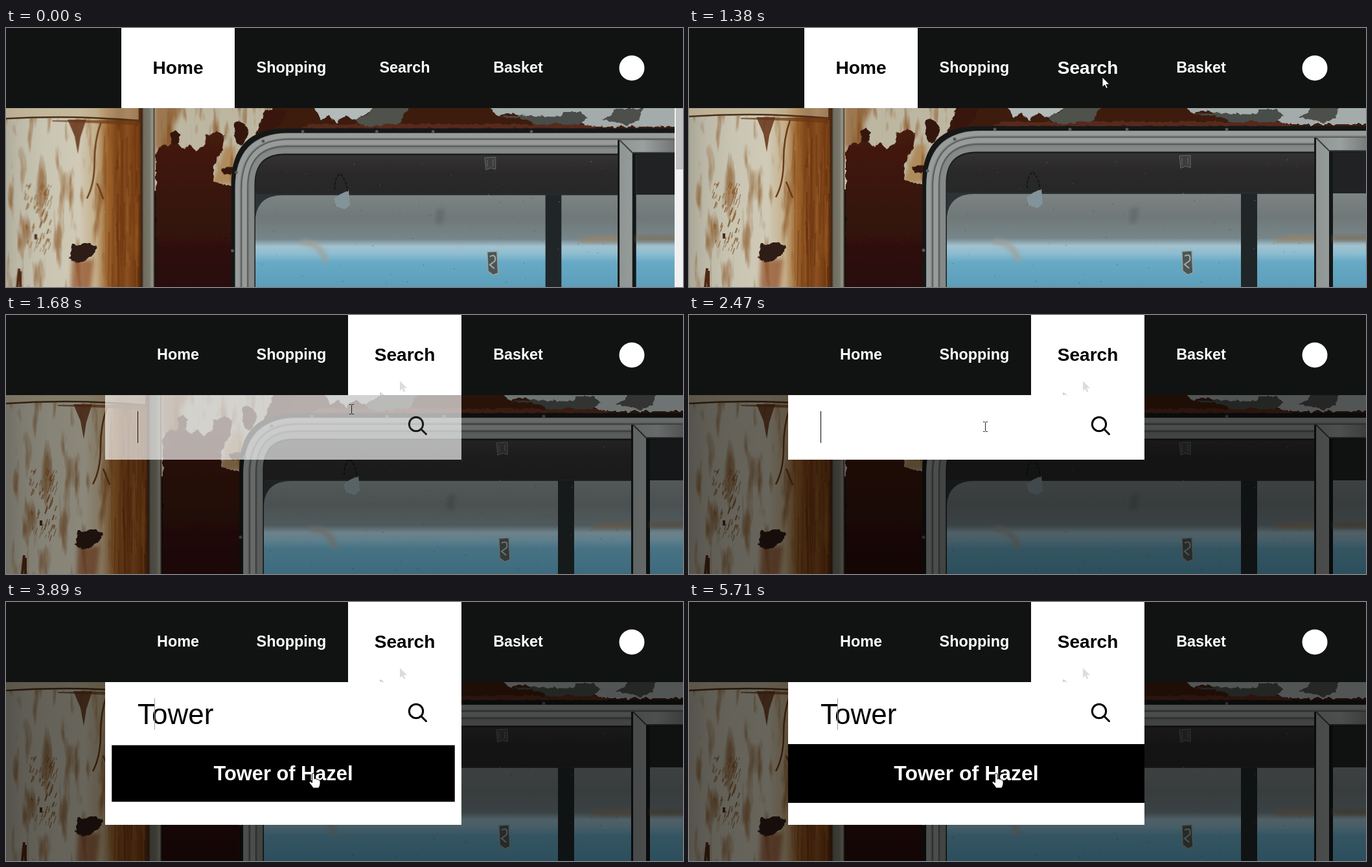
An HTML page that plays this animation: 1045 px wide and 401 px high, repeating every 5.89 s.

```html
<!DOCTYPE html>
<html lang="en">
<head>
<meta charset="utf-8">
<title>Shop navigation</title>
<style>
html, body { margin: 0; width: 100%; height: 100%; overflow: hidden; background: #101312; }
svg { display: block; width: 1045px; height: 401px; font-family: "Liberation Sans", Arial, sans-serif; }
.nav { font-weight: 700; font-size: 23.4px; text-anchor: middle; fill: #fff; }
</style>
</head>
<body>
<svg viewBox="0 0 1045 401" xmlns="http://www.w3.org/2000/svg">
<defs>
  <linearGradient id="wall">
    <stop offset="0" stop-color="#aaa798"/><stop offset=".12" stop-color="#bdb9a8"/>
    <stop offset=".3" stop-color="#c9c5b3"/><stop offset=".55" stop-color="#d0cab6"/>
    <stop offset=".67" stop-color="#c3ad88"/><stop offset=".75" stop-color="#a0672f"/>
    <stop offset=".83" stop-color="#713811"/><stop offset=".89" stop-color="#8a4f20"/>
    <stop offset=".95" stop-color="#71390f"/><stop offset="1" stop-color="#43200e"/>
  </linearGradient>
  <linearGradient id="post">
    <stop offset="0" stop-color="#2b2018"/><stop offset=".15" stop-color="#6f6c5d"/>
    <stop offset=".6" stop-color="#77766a"/><stop offset=".85" stop-color="#98978a"/><stop offset="1" stop-color="#3a2a1e"/>
  </linearGradient>
  <linearGradient id="rust" x2="0" y2="1">
    <stop offset="0" stop-color="#451b0e"/><stop offset=".45" stop-color="#37140a"/><stop offset="1" stop-color="#280e08"/>
  </linearGradient>
  <linearGradient id="view" gradientUnits="userSpaceOnUse" x1="0" y1="256" x2="0" y2="401">
    <stop offset="0" stop-color="#7b8383"/><stop offset=".25" stop-color="#707878"/>
    <stop offset=".48" stop-color="#76868a"/><stop offset=".56" stop-color="#a2c2cf"/>
    <stop offset=".64" stop-color="#8dbdd0"/><stop offset=".73" stop-color="#68aac5"/><stop offset="1" stop-color="#5b9eb9"/>
  </linearGradient>
  <linearGradient id="shade" x2="0" y2="1">
    <stop offset="0" stop-color="#363433"/><stop offset=".4" stop-color="#2a2929"/><stop offset="1" stop-color="#242627"/>
  </linearGradient>
  <linearGradient id="bar">
    <stop offset="0" stop-color="#8f9593"/><stop offset=".4" stop-color="#9aa09e"/><stop offset="1" stop-color="#6c706e"/>
  </linearGradient>
  <filter id="soft" x="-20%" y="-20%" width="140%" height="140%"><feGaussianBlur stdDeviation="3"/></filter>
  <filter id="fine" x="-10%" y="-10%" width="120%" height="120%"><feGaussianBlur stdDeviation=".6"/></filter>
  <filter id="stain" x="0" y="0" width="100%" height="100%" color-interpolation-filters="sRGB">
    <feTurbulence type="fractalNoise" baseFrequency=".07 .014" numOctaves="3" seed="4"/>
    <feColorMatrix values="0 0 0 0 .52  0 0 0 0 .3  0 0 0 0 .1  4 0 0 0 -2.1"/>
    <feComposite in2="SourceGraphic" operator="in"/>
  </filter>
  <filter id="ragged" x="-5%" y="-5%" width="110%" height="110%">
    <feTurbulence type="fractalNoise" baseFrequency=".12" numOctaves="2" seed="9"/>
    <feDisplacementMap in="SourceGraphic" scale="7" xChannelSelector="R" yChannelSelector="G"/>
  </filter>
  <clipPath id="pane"><path d="M398 410V240Q398 194 444 194H966V410Z"/></clipPath>
  <clipPath id="page"><rect y="124" width="1045" height="277"/></clipPath>
  <path id="arrow" d="M0 0V15.5L3.6 12.2L6 17.6L8.4 16.6L6 11.3H11Z"/>
</defs>

<g clip-path="url(#page)">
<g id="photo">
  <rect y="110" width="222" height="300" fill="url(#wall)"/>
  <rect y="136" width="218" height="274" filter="url(#stain)" opacity=".6"/>
  <path d="M0 110H215V138Q110 130 0 136Z" fill="#bfae8c" opacity=".6"/>
  <path d="M0 137Q110 130 215 140" fill="none" stroke="#4a2f1a" stroke-width="2.5"/>
  <g id="drips" filter="url(#fine)"></g>
  <path d="M80 139H215V147Q150 143 80 141Z" fill="#6a3815" opacity=".7"/>
  <path d="M104 138H133L124 166L120 192L115 164Z" fill="#653418" opacity=".85"/>
  <path d="M156 143Q146 170 146 205T134 262M150 238L160 263" fill="none" stroke="#6b3a18" stroke-width="2.5"/>
  <path d="M111 358H145L140 405H109Z" fill="#8c451a" opacity=".65" filter="url(#soft)"/>
  <path d="M107 356L112 334L124 337L131 331L149 336L148 347L134 358L119 363Z" fill="#2f1a12" filter="url(#ragged)"/>

  <rect x="240" y="110" width="210" height="140" fill="#bdb7a2"/>
  <path d="M240 110H290L270 150L275 185H240Z" fill="#85501f" opacity=".6" filter="url(#soft)"/>
  <path d="M350 180H366V240H330Z" fill="#a56d2e" opacity=".6" filter="url(#soft)"/>
  <rect x="240" y="110" width="200" height="130" filter="url(#stain)" opacity=".7"/>
  <g filter="url(#ragged)">
    <path d="M242 405V190L250 177L262 180L270 168L283 183L297 178L303 187L317 181L322 163L338 156L349 165L346 185L333 211L331 236L365 243V405Z" fill="url(#rust)"/>
    <path d="M264 160L273 154L281 160L276 178L268 175ZM364 143L376 141L387 153L384 170L373 179L366 169ZM345 215L356 211L365 215L358 225L347 224Z" fill="#35160d"/>
  </g>
  <rect x="220" y="110" width="20" height="300" fill="url(#post)"/>

  <g filter="url(#ragged)">
    <path d="M424 110H1060V165H410L426 148Z" fill="#3d1c11"/>
    <path d="M480 145H930V152H470Z" fill="#693420" opacity=".6"/>
    <path d="M487 110L500 140L512 132L524 143L540 131L552 139L580 125V110Z" fill="#b3babA"/>
    <path d="M552 139L575 129L586 110H642L624 145L570 149Z" fill="#50514c"/>
    <path d="M760 110L775 131L802 128L825 137L862 135L905 142L925 149H1060V110Z" fill="#a3acab"/>
    <path d="M778 133L824 138L834 145H905L918 136L908 126H880L874 134L820 132Z" fill="#4a4e49"/>
    <path d="M940 137L956 132L960 121H1004L998 140L980 147Z" fill="#4d504c"/>
    <path d="M415 122H448L441 140L424 158L396 165Z" fill="#38170e"/>
  </g>

  <path d="M360 410V240Q360 152 446 152H1060V410Z" fill="#151717"/>
  <path d="M366 410V246Q366 159 450 159H1060V410Z" fill="#7d8280"/>
  <g fill="none">
    <path d="M370 410V247Q370 163 452 163H1060" stroke="#989d9b" stroke-width="7"/>
    <path d="M376 410V247Q376 169 452 169H1060" stroke="#555957" stroke-width="1.500"/>
    <path d="M381 410V246Q381 174 450 174H966" stroke="#979c9a" stroke-width="7"/>
    <path d="M386 410V244Q386 180 448 180H966" stroke="#5a5e5b" stroke-width="2"/>
    <path d="M392 410V242Q392 187 446 187H966" stroke="#858a88" stroke-width="7"/>
    <path d="M398 410V240Q398 193 444 193H966" stroke="#1b1d1d" stroke-width="3"/>
  </g>
  <g clip-path="url(#pane)">
    <rect x="390" y="190" width="590" height="80" fill="url(#shade)"/>
    <rect x="390" y="255" width="590" height="155" fill="#2d3334"/>
    <path d="M398 415V292Q402 257 440 257H980V415Z" fill="url(#view)" filter="url(#fine)"/>
    <path d="M470 330Q503 333 508 362" fill="none" stroke="#a39c92" stroke-width="9" opacity=".7" filter="url(#soft)"/>
    <path d="M852 256H877V410H852Z" fill="#202628" filter="url(#fine)"/>
    <path d="M903 326Q930 318 980 321V331H905Z" fill="#9b8264" opacity=".7" filter="url(#soft)"/>
    <path d="M682 280L694 277L690 303L680 301Z" fill="#555e5f" opacity=".5" filter="url(#soft)"/>
    <g id="dust"></g>
  </g>
  <path d="M521 262L531 255L544 249L546 272L538 279L524 274Z" fill="#83939a"/>
  <path d="M522 248Q522 228 531 223Q540 232 542 251" fill="none" stroke="#151719" stroke-width="2" stroke-dasharray="5 2"/>
  <path d="M757 198L774 197V216L766 214L759 217ZM761 201V212M770 200V211" fill="#3c3d3d" stroke="#686c6b"/>
  <path d="M761 346L776 345L778 379L770 382L762 376Z" fill="#4a5555" stroke="#98a09c" stroke-width="1.5"/>
  <path d="M765 353Q775 348 773 360L765 366L772 372" fill="none" stroke="#a8aca5" stroke-width="2"/>

  <rect x="965" y="170" width="100" height="240" fill="#141718"/>
  <path d="M968 170H1060V190H988V410H968Z" fill="url(#bar)"/>
  <path d="M968 170L988 190H1060" fill="none" stroke="#3b3f3e" stroke-width="2"/>
  <rect x="994" y="194" width="70" height="220" fill="url(#view)"/>
  <rect x="994" y="192" width="70" height="64" fill="#202223"/>
  <path d="M994 320H1060V330H994Z" fill="#806e58" opacity=".7" filter="url(#soft)"/>
  <g id="rivets" fill="#555a58"></g>
</g>
<rect id="dim" y="124" width="1045" height="277" opacity="0"/>
<g id="scroll"><path d="M1032 124H1045V401H1032Z" fill="#f1f1f1"/><path d="M1034 124H1045V219H1034Z" fill="#c1c1c1"/></g>
</g>

<rect width="1045" height="124" fill="#101312"/>
<rect id="homeBg" x="178" width="175" height="124" fill="#fff"/>
<rect id="searchBg" x="528" width="175" height="124" fill="#fff"/>
<g class="nav">
  <text id="home" y="8.1">Home</text>
  <text x="440.5" y="69.1">Shopping</text>
  <text id="search" y="8.1">Search</text>
  <text x="790.5" y="69.1">Basket</text>
</g>
<circle cx="966" cy="62" r="19.5" fill="#fff"/>

<g id="panel">
  <rect id="sheet" x="153" y="124" width="550" height="100" fill="#fff"/>
  <g fill="none" stroke="#000" stroke-width="3" stroke-linecap="round"><circle cx="633" cy="169" r="10.7"/><path d="M641 177L648.5 184.5"/></g>
  <g id="row">
    <rect id="rowBg" x="-275" y="-45.5" width="550" height="91"/>
    <text id="rowText" y="10.8" font-size="32" font-weight="700" text-anchor="middle">Tower of Hazel</text>
  </g>
  <text id="typed" x="203" y="189" font-size="44"></text>
  <rect id="mark" x="229" y="149" width="1" height="49" fill="#a0a0a0"/>
  <rect id="caret" y="149" width="1" height="49"/>
</g>
<g id="trail" fill="#dcdcdc">
  <use href="#arrow" x="608" y="102"/>
  <path d="M578 124V120.5L582.5 124" fill="none" stroke="#aaa"/>
</g>
<g id="pointer">
  <use id="tip" href="#arrow" fill="#fff" stroke="#000" stroke-width=".9"/>
  <path id="beam" d="M-3.5 -7.5H-1L0 -6.5L1 -7.5H3.5M0 -6.5V6.5M-3.5 7.5H-1L0 6.5L1 7.5H3.5" fill="none" stroke="#222"/>
  <path id="hand" d="M-1.5 0Q0 -2 2 0V8Q4 6.5 5.5 8.5Q7.5 7.5 8.5 9.5Q11 9 11 12V16Q10.5 19 8.5 22H0Q-2 18 -6 14Q-6.5 11 -3.5 12L-1.5 14Z" fill="#fff" stroke="#000" stroke-width=".9"/>
</g>
</svg>
<script>
const LOOP = 5890;
const $ = id => document.getElementById(id);
const set = (id, attrs) => { for (const k in attrs) $(id).setAttribute(k, attrs[k]); };
const show = (id, on) => set(id, { visibility: on ? "visible" : "hidden" });
const clamp = v => Math.max(0, Math.min(1, v));
const part = (t, from, length) => clamp((t - from) / length);
const sine = p => (1 - Math.cos(Math.PI * p)) / 2;
const grey = v => { const n = Math.round(255 * v); return `rgb(${n},${n},${n})`; };

// The CSS "ease" curve, solved by bisection
function ease(p) {
  let lo = 0, hi = 1;
  for (let i = 0; i < 20; i++) {
    const u = (lo + hi) / 2, w = 1 - u;
    if (.75 * w * w * u + .75 * w * u * u + u * u * u < p) lo = u; else hi = u;
  }
  const w = 1 - lo;
  return .3 * w * w * lo + 3 * w * lo * lo + lo * lo * lo;
}

let seed = 7;
const rnd = () => (seed = seed * 16807 % 2147483647) / 2147483647;

// Streaks and specks of the photo
function paint() {
  let drips = "", dust = "", rivets = "";
  for (let i = 0; i < 50; i++) {
    const x = 160 + rnd() * 58, y = 138 + rnd() * 190, h = 30 + rnd() * 110;
    drips += `<path d="M${x} ${y}l${rnd() * 4 - 2} ${h}" stroke="${rnd() < .5 ? "#4d230c" : "#a8682d"}" stroke-width="${1 + rnd() * 2}" opacity=".3"/>`;
  }
  for (let i = 0; i < 70; i++) {
    const x = 38 + rnd() * 42, y = 235 + rnd() * 110, h = 3 + rnd() * 9;
    drips += `<path d="M${x} ${y}l${-h / 3} ${h}" stroke="#80501f" stroke-width="${.8 + rnd() * 1.2}" opacity=".7"/>`;
  }
  drips += '<path d="M54 318v8M28 372l-3 30M30 376v28" stroke="#4c2812" stroke-width="4"/>';
  for (let i = 0; i < 130; i++)
    dust += `<circle cx="${400 + rnd() * 565}" cy="${200 + rnd() * 200}" r="${.4 + rnd() * .6}" fill="${rnd() < .6 ? "#8d999b" : "#39444a"}" opacity=".4"/>`;
  for (const [x, y] of [[472, 157], [588, 157], [676, 157], [830, 157], [410, 172], [368, 221], [362, 344]])
    rivets += `<circle cx="${x}" cy="${y}" r="2.5"/>`;
  $("drips").innerHTML = drips;
  $("dust").innerHTML = dust;
  $("rivets").innerHTML = rivets;
}

const path = [
  [530, 817, 332], [620, 770, 250], [720, 700, 150], [820, 655, 95], [1000, 638, 76],
  [1380, 638, 76], [1530, 607, 100], [1600, 577, 120], [1680, 533, 146], [1800, 475, 168], [1900, 457, 173],
  [3590, 457, 173], [3700, 462, 215], [3800, 470, 255], [3890, 474, 266]
];
function pointerAt(t) {
  const i = path.findIndex(k => k[0] > t);
  if (i < 0) return path[path.length - 1].slice(1);
  if (i === 0) return path[0].slice(1);
  const a = path[i - 1], b = path[i], p = part(t, a[0], b[0] - a[0]);
  return [a[1] + (b[1] - a[1]) * p, a[2] + (b[2] - a[2]) * p];
}

const keys = [2550, 2830, 2910, 3000, 3080];
const caretOff = [[1910, 2470], [3590, 4120], [4650, 5210], [5710, LOOP]];
const label = (id, x, size, tone) => set(id, { transform: `translate(${x} 61) scale(${size})`, fill: grey(tone) });

function draw(t) {
  const open = t >= 1330;
  set("photo", { transform: open ? "" : "scale(.986) translate(-7.5 5.8)" });
  show("scroll", !open);

  const swap = ease(part(t, 1385, 300));
  set("homeBg", { opacity: 1 - swap });
  set("searchBg", { opacity: swap });
  label("home", 265.5, 1.2 - .2 * swap, swap);
  label("search", 615.5, 1 + .2 * ease(part(t, 760, 250)), 1 - swap);

  const fade = sine(part(t, 1380, 500));
  set("dim", { opacity: .5 * fade });
  set("panel", { opacity: fade });

  const count = keys.filter(k => k <= t).length;
  set("sheet", { height: count === 0 ? 100 : count < 3 ? 277 : 221 });
  $("typed").textContent = "Tower".slice(0, count);
  const end = count ? 203 + $("typed").getComputedTextLength() : 203;
  set("caret", { x: Math.floor(end) });
  show("caret", !caretOff.some(([a, b]) => t >= a && t < b));
  show("mark", count > 1);

  const tone = ease(part(t, 3690, 190));
  show("row", count > 0);
  set("row", { transform: `translate(428 265.5) scale(${.9 + .1 * sine(part(t, 3600, 500))})` });
  set("rowBg", { fill: grey(1 - tone) });
  set("rowText", { fill: grey(tone) });

  const [x, y] = pointerAt(t);
  const kind = t < 530 ? "" : t < 1330 || y < 124 ? "tip" : y < 220 ? "beam" : "hand";
  for (const id of ["tip", "beam", "hand"]) show(id, id === kind);
  set("pointer", { transform: `translate(${Math.round(x) + (kind === "beam" ? .5 : 0)} ${Math.round(y)})` });
  show("trail", t >= 1630);
}

paint();
const start = performance.now();
function tick() {
  draw((performance.now() - start) % LOOP);
  requestAnimationFrame(tick);
}
draw(0);
requestAnimationFrame(tick);
</script>
</body>
</html>
```
